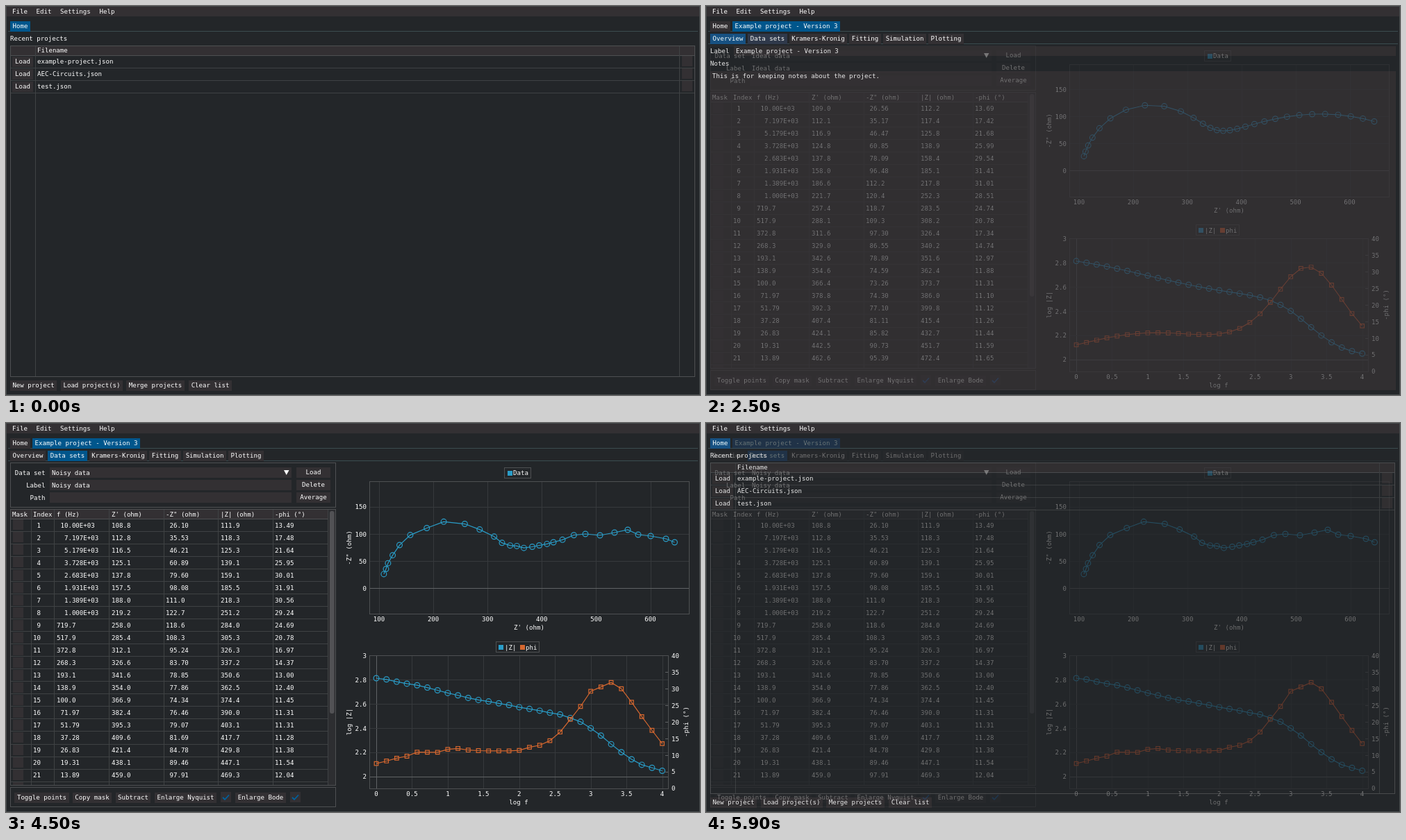
Recreate the animation shown at these times as an HTML page with a canvas. Size 999x561 px, loop 6000 ms.

```html
<!DOCTYPE html>
<html>
<head>
<meta charset="utf-8">
<style>
html, body { margin: 0; height: 100%; overflow: hidden; background: #232629; }
canvas { display: block; }
</style>
</head>
<body>
<canvas id="stage" width="999" height="561"></canvas>
<script>
const W = 999, H = 561;
const BG = '#232629', PANEL = '#333033', ACTIVE = '#00568c', EDGE = '#4e5052',
      GRID = '#36393c', ZERO = '#606365', BLUE = '#2a9dc8', ORANGE = '#d5672f';
let g;

function newCanvas() {
  const c = document.createElement('canvas');
  c.width = W; c.height = H;
  return c;
}
function box(x, y, x2, y2, color = PANEL) {
  g.fillStyle = color;
  g.fillRect(x, y, x2 - x, y2 - y);
}
function frame(x, y, x2, y2, color = EDGE) {
  g.strokeStyle = color;
  g.lineWidth = 1;
  g.strokeRect(x + .5, y + .5, x2 - x - 1, y2 - y - 1);
}
const hline = (x, x2, y, color = EDGE) => box(x, Math.round(y), x2, Math.round(y) + 1, color);
const vline = (x, y, y2, color = EDGE) => box(Math.round(x), y, Math.round(x) + 1, y2, color);

// y is the middle of the capitals
function text(s, x, y, align = 'left') {
  g.font = '9.1px "DejaVu Sans Mono", monospace';
  g.textAlign = align;
  g.fillStyle = '#fff';
  g.fillText(s, x, y + 3.4);
}
function upright(s, x, y) {
  g.save();
  g.translate(x, y);
  g.rotate(-Math.PI / 2);
  text(s, 0, 0, 'center');
  g.restore();
}
function button(s, x, x2, y, color = PANEL) {
  box(x, y - 7, x2, y + 8, color);
  text(s, (x + x2) / 2, y, 'center');
}
function tabs(y, active, list) {
  hline(3, 996, y + 7, '#3b4c50');
  list.forEach(([s, x, x2], i) => button(s, x, x2, y, i === active ? ACTIVE : PANEL));
}

function base() {
  box(0, 0, W, H, BG);
  box(0, 0, W, 15);
  frame(0, 0, W, H, '#44484a');
  [['File', 9], ['Edit', 43.5], ['Settings', 78], ['Help', 134.5]].forEach(([s, x]) => text(s, x, 8));
}

function home() {
  base();
  tabs(29, 0, [['Home', 6, 35]]);
  text('Recent projects', 6, 47);
  box(6, 57, 992, 71);
  text('Filename', 45, 64);
  ['example-project.json', 'AEC-Circuits.json', 'test.json'].forEach((s, i) => {
    const y = 80 + 18 * i;
    button('Load', 9, 39, y);
    text(s, 45, y);
    box(973, y - 8, 988, y + 7);
    hline(6, 992, y + 9, '#3f4244');
  });
  hline(6, 992, 71);
  vline(42, 57, 535, '#3f4244');
  vline(969, 57, 535, '#3f4244');
  frame(6, 57, 992, 535);
  [['New project', 6, 73], ['Load project(s)', 79, 168], ['Merge projects', 173, 257], ['Clear list', 263, 325]]
    .forEach(([s, x, x2]) => button(s, x, x2, 547));
}

function project(active) {
  base();
  tabs(29, 1, [['Home', 6, 35], ['Example project - Version 3', 38, 193]]);
  tabs(47, active, [['Overview', 6, 57], ['Data sets', 60, 117], ['Kramers-Kronig', 120, 203],
    ['Fitting', 206, 252], ['Simulation', 255, 317], ['Plotting', 320, 371]]);
}

function overview() {
  project(0);
  text('Label', 6, 65);
  box(40, 58, 993, 72);
  text('Example project - Version 3', 43, 65);
  text('Notes', 6, 83);
  box(6, 94, 993, 554);
  text('This is for keeping notes about the project.', 9, 101);
}

// Impedance of the circuit R(RC)(RW) as [Z', -Z"]
function impedance(f) {
  const w = 2 * Math.PI * f, a = w * 200 * 8e-7, d = 1 + a * a;
  const y = 4e-4 * Math.sqrt(w / 2), c = y + 1 / 500, m = c * c + y * y;
  return [100 + 200 / d + c / m, 200 * a / d + y / m];
}
const freqs = Array.from({ length: 29 }, (_, i) => 10 ** (4 - i / 7));
const ideal = freqs.map(impedance);
const noisyRe = [108.8, 112.8, 116.5, 125.1, 137.8, 157.5, 188, 219.2, 258, 285.4, 312.1, 326.6, 341.6, 354,
  366.9, 382.4, 395.3, 409.6, 421.4, 438.1, 459, 480.3, 507.2, 534, 558.4, 577.6, 600.6, 628.8, 644.8];
const noisyIm = [26.1, 35.53, 46.21, 60.89, 79.6, 98.08, 111, 122.7, 118.6, 108.3, 95.24, 83.7, 78.85, 77.86,
  74.34, 76.46, 79.07, 81.69, 84.78, 89.46, 97.91, 100.1, 97.6, 102.7, 107.8, 98.8, 96.3, 91.2, 84.8];
const noisy = noisyRe.map((re, i) => [re, noisyIm[i]]);
const phase = ([re, im]) => Math.atan2(im, re) * 180 / Math.PI;

// Four digits, lined up at the decimal point
function digits(v, whole = 3) {
  const s = v > 999.9 ? v.toExponential(3).replace('e+', 'E+0') : v.toPrecision(4);
  if (v > 9999) return ' 10.00E+03';
  return ' '.repeat(whole - s.indexOf('.')) + s;
}

function table(data) {
  const cols = [9, 39, 73, 152, 230, 309, 387];
  box(6, 125, 474, 138);
  ['Mask', 'Index', 'f (Hz)', "Z' (ohm)", '-Z" (ohm)', '|Z| (ohm)', '-phi (°)']
    .forEach((s, i) => text(s, cols[i], 132));
  for (let i = 0; i < 22; i++) {
    const y = 147.4 + 18.03 * i, top = Math.round(y - 8);
    box(10, top, 25, Math.min(top + 15, 522));
    if (i > 20) break;
    hline(6, 464, y + 8.6, '#3f4244');
    const z = data[i];
    [String(i + 1).padStart(2), digits(freqs[i]), digits(z[0]), digits(z[1]), digits(Math.hypot(...z)), digits(phase(z), 2)]
      .forEach((s, k) => text(s, cols[k + 1], y));
  }
  hline(6, 464, 138);
  [36, 69, 148, 227, 305, 384, 463].forEach(x => vline(x, 125, 522, '#3f4244'));
  box(464, 125, 474, 522, '#2d2e31');
  g.fillStyle = '#525255';
  g.beginPath();
  g.roundRect(466, 127, 6.5, 292, 3);
  g.fill();
  frame(6, 124, 475, 523);
}

function series(points, color, square) {
  g.strokeStyle = color;
  g.lineWidth = 1.2;
  g.beginPath();
  points.forEach(p => g.lineTo(...p));
  g.stroke();
  points.forEach(([x, y]) => {
    g.beginPath();
    if (square) g.rect(x - 2.8, y - 2.8, 5.6, 5.6);
    else g.arc(x, y, 3.9, 0, 7);
    g.stroke();
  });
}

function nyquist(data, scale, zero) {
  const X = v => 537 + (v - 100) * scale, Y = v => zero - v * .782;
  for (let v = 100; v <= 600; v += 100) {
    vline(X(v), 84, 275, GRID);
    text(v, X(v), 283, 'center');
  }
  for (let v = 0; v <= 150; v += 50) {
    hline(523, 983, Y(v), v ? GRID : ZERO);
    text(v, 519, Y(v), 'right');
  }
  frame(523, 84, 984, 276);
  text("Z' (ohm)", 753, 295, 'center');
  upright('-Z" (ohm)', 494, 180);
  series(data.map(([re, im]) => [X(re), Y(im)]), BLUE);
  frame(717, 64, 756, 80);
  box(722, 69, 729, 76, BLUE);
  text('Data', 730, 72);
}

function bode(data) {
  const X = v => 533 + v * 102.9, Y = v => 510 - (v - 2) * 174.6, P = v => 527 - v * 4.79;
  for (let v = 0; v <= 4; v += .5) {
    vline(X(v), 336, 527, v ? GRID : ZERO);
    text(v, X(v), 535, 'center');
  }
  for (let i = 0; i <= 5; i++) {
    const v = 2 + i / 5;
    hline(523, 953, Y(v), i ? GRID : ZERO);
    text(+v.toFixed(1), 519, Y(v), 'right');
  }
  for (let v = 0; v <= 40; v += 5) {
    text(v, 958, P(v));
    hline(949, 953, P(v), ZERO);
  }
  frame(523, 335, 954, 528);
  text('log f', 738, 547, 'center');
  upright('log |Z|', 494, 431);
  upright('-phi (°)', 979, 431);
  const at = i => X(4 - i / 7);
  series(data.map((z, i) => [at(i), Y(Math.log10(Math.hypot(...z)))]), BLUE);
  series(data.map((z, i) => [at(i), P(phase(z))]), ORANGE, true);
  frame(705, 315, 768, 331);
  box(709, 320, 716, 327, BLUE);
  text('|Z|', 718, 324);
  box(740, 320, 747, 327, ORANGE);
  text('phi', 748, 324);
}

function check(x) {
  box(x, 532, x + 15, 547);
  g.strokeStyle = '#00629f';
  g.lineWidth = 1.8;
  g.beginPath();
  g.moveTo(x + 3, 540);
  g.lineTo(x + 6, 543);
  g.lineTo(x + 12, 536.5);
  g.stroke();
}

function dataSets(name, data, scale, zero) {
  project(1);
  frame(6, 57, 475, 122);
  [['Data set', 'Load', name], ['Label', 'Delete', name], ['Path', 'Average', '']].forEach(([label, action, value], i) => {
    const y = 71 + 18 * i;
    text(label, 56.5, y + .5, 'right');
    box(63, y - 7, 411, y + 8);
    text(value, 66, y + .5);
    button(action, 418, 467, y);
  });
  g.fillStyle = '#fff';
  g.beginPath();
  g.moveTo(400, 68);
  g.lineTo(407.5, 68);
  g.lineTo(403.7, 75);
  g.fill();
  table(data);
  frame(6, 525, 475, 554);
  [['Toggle points', 12, 91], ['Copy mask', 96, 152], ['Subtract', 158, 208], ['Enlarge Nyquist', 214, 303], ['Enlarge Bode', 330, 403]]
    .forEach(([s, x, x2]) => button(s, x, x2, 540));
  check(309);
  check(409);
  nyquist(data, scale, zero);
  bode(data);
}

const scenes = [
  home,
  overview,
  () => dataSets('Ideal data', ideal, .779, 237.4),
  () => dataSets('Noisy data', noisy, .781, 238.3)
].map(draw => {
  const c = newCanvas();
  g = c.getContext('2d', { willReadFrequently: true });
  draw();
  return c;
});

// Cross-fade in linear light
const linear = Float32Array.from({ length: 256 }, (_, i) => (i / 255) ** 2.2);
const encode = Uint8ClampedArray.from({ length: 4097 }, (_, i) => Math.round(255 * (i / 4096) ** (1 / 2.2)));
function mix(from, to, k) {
  const [a, b] = [from, to].map(c => c.getContext('2d').getImageData(0, 0, W, H));
  for (let i = 0; i < a.data.length; i++) {
    const p = a.data[i], q = b.data[i];
    if (p !== q) a.data[i] = encode[Math.round(4096 * (linear[p] * (1 - k) + linear[q] * k))];
  }
  const c = newCanvas();
  c.getContext('2d').putImageData(a, 0, 0);
  return c;
}
// Per scene: the still, then five steps towards the next
const steps = scenes.map((c, i) => [c, ...[1, 2, 3, 4, 5].map(n => mix(c, scenes[(i + 1) % 4], n / 6))]);

const stage = document.getElementById('stage').getContext('2d');
const start = performance.now();
function tick() {
  const t = (performance.now() - start) % 6000, p = t % 1500;
  const n = p < 1000 ? 0 : Math.floor((p - 900) / 100);
  stage.drawImage(steps[Math.floor(t / 1500)][n], 0, 0);
  requestAnimationFrame(tick);
}
tick();
</script>
</body>
</html>
```
